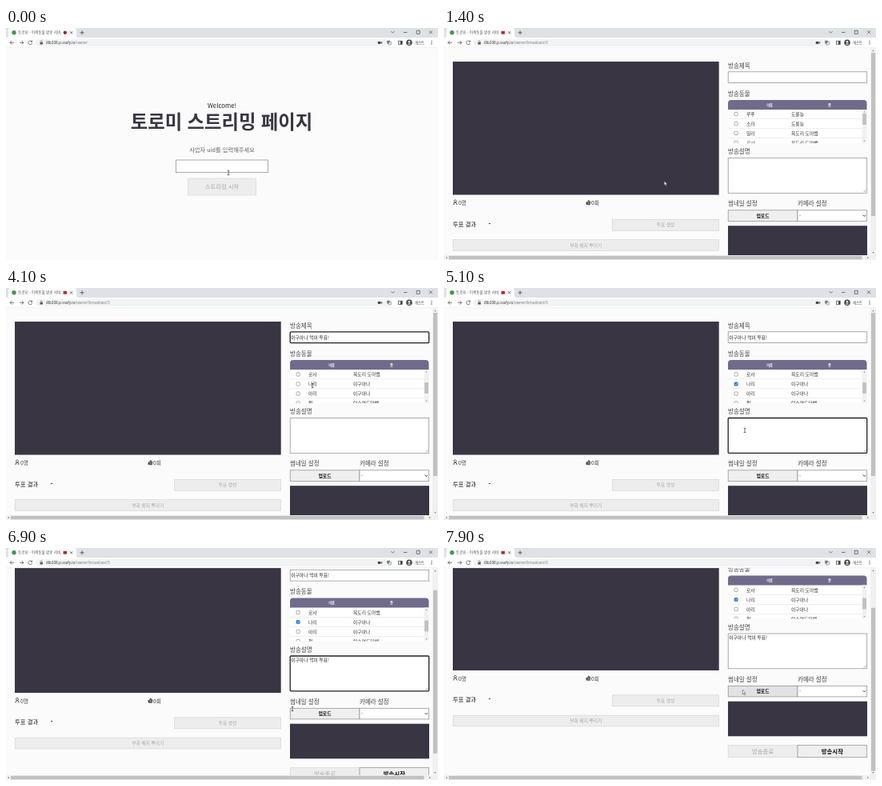
An HTML page that plays this animation: 540 by 290 pixels, repeating every 8000 ms.

```html
<!DOCTYPE html>
<html lang="ko">
<head>
<meta charset="utf-8">
<title>스트리밍 페이지</title>
<style>
html, body { margin: 0; width: 100%; height: 100%; overflow: hidden; background: #fbfbfb; }
svg { display: block; width: 540px; height: 290px; }
text { font-family: "Noto Sans CJK KR", "Noto Sans CJK", sans-serif; white-space: pre; }
.url { font-family: "Open Sans", sans-serif; }
</style>
</head>
<body>
<svg id="stage" viewBox="0 0 540 290"></svg>
<script>
const LOOP = 8000, STEP = 100;
const DARK = '#393543', INK = '#333', MUTED = '#a9a9a9';
const MESSAGE = '이구아나 먹이 투표!';
const ANIMALS = [['루푸', '도롱뇽'], ['소라', '도롱뇽'], ['일라', '목도리 도마뱀'], ['로사', '목도리 도마뱀'],
  ['나리', '이구아나'], ['아리', '이구아나'], ['펄', '턱수염도마뱀']];

// Key points: time, value(s)
const CURSOR = [[0, 278, 181], [700, 278, 181], [1200, 276, 192], [1600, 276, 192], [2300, 388, 65],
  [3500, 388, 65], [3800, 383, 122], [4200, 383, 122], [4500, 365, 120], [4700, 365, 120],
  [5000, 376, 178], [6400, 376, 178], [6900, 358, 201], [7300, 358, 201], [7800, 374, 178]];
const SCROLL = [[6400, 0], [6900, 27.5], [7300, 55.5]];
const LIST = [[3600, 0], [4000, 35.5]];
const TITLE = [[2900, 0], [3100, 4], [3200, 4], [3500, 11]];
const ABOUT = [[5700, 0], [6100, 11]];

function at(keys, t, i = 1) {
  let a = keys[0];
  for (const b of keys) {
    if (t < b[0]) return a === b ? a[i] : a[i] + (b[i] - a[i]) * (t - a[0]) / (b[0] - a[0]);
    a = b;
  }
  return a[i];
}

const rect = (x, y, w, h, fill, stroke = 'none', sw = .7, r = 0) =>
  `<rect x="${x}" y="${y}" width="${w}" height="${h}" rx="${r}" fill="${fill}" stroke="${stroke}" stroke-width="${sw}"/>`;
const path = (d, stroke = '#444', sw = .8, fill = 'none') =>
  `<path d="${d}" fill="${fill}" stroke="${stroke}" stroke-width="${sw}"/>`;
const circle = (x, y, r, fill, stroke = 'none') =>
  `<circle cx="${x}" cy="${y}" r="${r}" fill="${fill}" stroke="${stroke}" stroke-width=".7"/>`;
// y is the vertical middle of the line
const text = (x, y, str, size, fill = INK, weight = 400, anchor = 'start') =>
  `<text x="${x}" y="${y + size * .37}" font-size="${size}" fill="${fill}" font-weight="${weight}" text-anchor="${anchor}">${str}</text>`;
const mid = (x, y, str, size, fill, weight) => text(x, y, str, size, fill, weight, 'middle');
const clip = (x, y, w, h, body) =>
  `<svg x="${x}" y="${y}" width="${w}" height="${h}" viewBox="${x} ${y} ${w} ${h}">${body}</svg>`;
const tri = (x, y, dx, dy, fill = '#777') =>
  path(`M${x + dx} ${y + dy}L${x - dx - dy} ${y - dy - dx}L${x - dx + dy} ${y - dy + dx}Z`, 'none', 0, fill);

function button(x, y, w, h, label, size, on, fill = '#efefef') {
  return rect(x, y, w, h, on ? fill : '#ededed', on ? '#8a8a8a' : '#d6d6d6') +
    mid(x + w / 2, y + h / 2, label, size, on ? '#111' : MUTED, on ? 700 : 400);
}
const field = (x, y, w, h, focus) =>
  rect(x, y, w, h, '#fff', focus ? '#222' : '#8a8a8a', focus ? 1.3 : .7, focus ? 1 : 0);

function browser(t) {
  const path2 = t < 1400 ? '/owner' : '/owner/broadcast/3';
  return rect(0, 0, 540, 12, '#dee1e6') + rect(0, 12, 540, 13, '#fff') +
    path('M1 12Q3 12 3 9V3Q3 0 6 0H85Q88 0 88 3V9Q88 12 90 12Z', 'none', 0, '#fff') +
    circle(10, 5.7, 2.7, '#3a9d3c') +
    clip(14, 0, 55, 12, text(15, 5.7, '토로미 - 이색동물 방송 서비스', 4.6, '#555')) +
    (t < 200 ? circle(73.8, 5.8, 2.2, '#b3282d') : rect(71.5, 3.8, 4.6, 4, '#c93036', 'none', 0, .6)) +
    circle(73.8, 5.8, .8, '#6b1a1d') +
    path('M80 4.2l3.2 3.2m0-3.2l-3.2 3.2M92.6 5.8h5m-2.5-2.5v5', '#444') +
    path('M481.5 4.2l2 2 2-2M497 5.5h4.5M513.2 3.3h4v4h-4zM529 3.3l4 4m0-4l-4 4', '#444', .7) +
    path('M10 18.3H5m2.4-2.4L5 18.3l2.4 2.4', '#555') +
    path('M17 18.3h5m-2.4-2.4l2.4 2.4-2.4 2.4', '#555') +
    path('M32.2 16.8A2.4 2.4 0 1 0 32.6 19M32.6 15.6v1.8h-1.8', '#555') +
    rect(37, 14, 446, 9, '#f1f3f4', 'none', 0, 4.5) +
    rect(42.5, 17.8, 3.4, 2.7, '#555') + path('M43.2 17.8v-1a1 1 0 0 1 2 0v1', '#555', .5) +
    `<text class="url" x="50" y="20.1" font-size="4.7" fill="#333">i8b208.p.ssafy.io<tspan fill="#777">${path2}</tspan></text>` +
    rect(464.8, 16.9, 3.6, 3, '#444') + path('M468.4 18.4l1.8-1.3v2.6z', 'none', 0, '#444') +
    rect(476.3, 15.8, 3.6, 3.8, '#6d7379') + rect(478.4, 17.5, 3.3, 3.5, '#dfe1e3', '#777', .4) +
    rect(490.6, 16.2, 4.6, 4.2, '#fff', '#444') + rect(493, 16.2, 2.2, 4.2, '#444') +
    circle(504, 18.3, 3.8, '#4a4d51') + circle(504, 17.2, 1.2, '#fff') +
    path('M501.8 20.6q2.2-2.7 4.4 0z', 'none', 0, '#fff') +
    text(511, 18.3, '게스트', 4.3) +
    [16.4, 18.3, 20.2].map(y => circle(532, y, .6, '#444')).join('') +
    rect(0, 24.6, 540, .5, '#e4e4e4');
}

function entryPage(t) {
  const ready = t >= 600;
  return mid(270, 97.5, 'Welcome!', 7.8, '#222', 500) +
    mid(269.5, 117.5, '토로미 스트리밍 페이지', 23.3, DARK, 700) +
    mid(270, 152.8, '사업자 uid를 입력해주세요', 7.25, '#666') +
    rect(212.5, 165, 115, 15.7, '#fff', '#858585') +
    (t >= 500 ? mid(270, 173, '3', 8, '#222', 500) : '') +
    button(227.7, 188, 84.6, 21, '스트리밍 시작', 7.3, ready, '#f0f0f0');
}

function table(t) {
  const top = at(LIST, t);
  const rows = ANIMALS.map(([name, kind], i) => {
    const y = 107.4 + i * 12 - top, on = i === 4 && t >= 4500;
    return rect(355, y + 5.7, 167.5, .5, '#dcdcdc') +
      rect(363, y - 2, 4.2, 4.2, on ? '#1a73e8' : '#fff', on ? '#1a73e8' : '#777', .6, .7) +
      (on ? path(`M364 ${y}l1 1.1 1.7-2.1`, '#fff', .7) : '') +
      text(378, y, name, 5.8) + text(434, y, kind, 5.8);
  }).join('');
  return rect(355, 102, 173.5, 42, '#fff') + clip(355, 102, 173.5, 42, rows) +
    path('M355 102V94Q355 90 359 90H524.5Q528.5 90 528.5 94V102Z', 'none', 0, '#706b8b') +
    mid(407, 96, '이름', 4.2, '#fff', 700) + mid(482, 96, '종', 4.2, '#fff', 700) +
    rect(522.5, 102, 6, 42, '#f1f1f1') + rect(523.2, 107 + top * .31, 4.8, 14, '#c1c1c1') +
    tri(525.5, 104.7, 0, -.8) + tri(525.5, 141.3, 0, .8);
}

function studioPage(t) {
  const title = MESSAGE.slice(0, Math.round(at(TITLE, t)));
  const about = MESSAGE.slice(0, Math.round(at(ABOUT, t)));
  const caret = t >= 5800 && t < 6500 ? '<tspan fill="#111">|</tspan>' : '';
  return rect(11, 42, 332.7, 166.5, DARK) +
    circle(14, 216.4, 1.5, 'none', '#333') + path('M12 221q0-3 2-3t2 3', '#333', .9) +
    text(18, 218.5, '0명', 6.8, '#444') +
    rect(177.6, 217.6, 1.3, 3.3, '#333') +
    path('M179.3 217.6l1.4-2.3q1-.1.8 1.8h1.5l-.6 3.8h-3.1z', '#333', .6, '#777') +
    text(184, 218.5, '0회', 6.8, '#444') +
    text(11, 245.2, '투표 결과', 7.4, '#222', 500) + text(55.5, 245, '-', 8, '#222', 700) +
    button(210.5, 239.3, 133, 14, '투표 생성', 5.7, false) +
    button(11.3, 264.7, 332.2, 13.7, '부화 배지 뿌리기', 5.7, false) +
    text(355, 47, '방송제목', 7.5, '#444') +
    field(355.2, 54.8, 173.5, 13.8, t >= 2300 && t < 4500) + text(356.2, 61.7, title, 5.8, '#222') +
    text(355, 82, '방송동물', 7.5, '#444') + table(t) +
    text(355, 154.5, '방송설명', 7.5, '#444') +
    field(355.2, 162.5, 173.5, 43.8, t >= 5100 && t < 7800) + text(356.2, 167.2, about + caret, 5.8, '#222') +
    path('M524.5 205l3-3m-1.2 3l1.2-1.2', '#666', .5) +
    text(355, 219.6, '썸네일 설정', 7.5, '#444') + text(442, 219.6, '카메라 설정', 7.5, '#444') +
    button(355.2, 227.8, 86.8, 13.6, '업로드', 5.9, true, t >= 7600 ? '#e2e2e2' : '#efefef') +
    rect(442, 227.8, 86.7, 13.6, '#fff', '#8a8a8a') + text(444, 234.5, '-', 5.8) +
    path('M523.7 233.7l1.7 1.7 1.7-1.7', '#222', .9) +
    rect(355, 247.2, 174, 43.6, DARK) +
    button(355.2, 302.2, 86.8, 15, '방송종료', 7.4, false) +
    button(442, 302.2, 86.7, 15, '방송시작', 7.4, true);
}

function scrollbars(s) {
  return rect(533, 25, 7, 259, '#f1f1f1') + rect(0, 284, 540, 6, '#f1f1f1') +
    rect(534, 31 + s * .79, 5.2, 204, '#c1c1c1') + rect(6, 284.8, 516.5, 4.5, '#c1c1c1') +
    tri(536.5, 28.2, 0, -1) + tri(536.5, 281, 0, 1) + tri(3, 287, -1, 0) + tri(530, 287, 1, 0);
}

function cursor(t) {
  if (t >= 3000 && t < 3500) return '';
  const x = at(CURSOR, t, 1), y = at(CURSOR, t, 2);
  const arrow = (t >= 900 && t < 2300) || (t >= 4300 && t < 5000) || t >= 7500;
  return arrow
    ? path(`M${x - .7} ${y - .5}v5.2l1.3-1.1.9 2 .9-.4-.9-1.9h1.7z`, '#333', .5, '#fff')
    : path(`M${x - 1.3} ${y - 2.6}h2.6m-1.3 0v5.2m-1.3 0h2.6`, '#333', .7);
}

function scene(t) {
  const s = at(SCROLL, t);
  const page = t < 1400 ? entryPage(t)
    : clip(0, 25, 533, 259, `<g transform="translate(0 ${-s})">${studioPage(t)}</g>`) + scrollbars(s);
  return rect(0, 0, 540, 290, '#fbfbfb') + page + browser(t) + cursor(t);
}

const stage = document.getElementById('stage'), start = performance.now();
let shown = -1;
function tick() {
  const t = Math.floor((performance.now() - start) % LOOP / STEP) * STEP;
  if (t !== shown) stage.innerHTML = scene(shown = t);
  requestAnimationFrame(tick);
}
tick();
</script>
</body>
</html>
```
